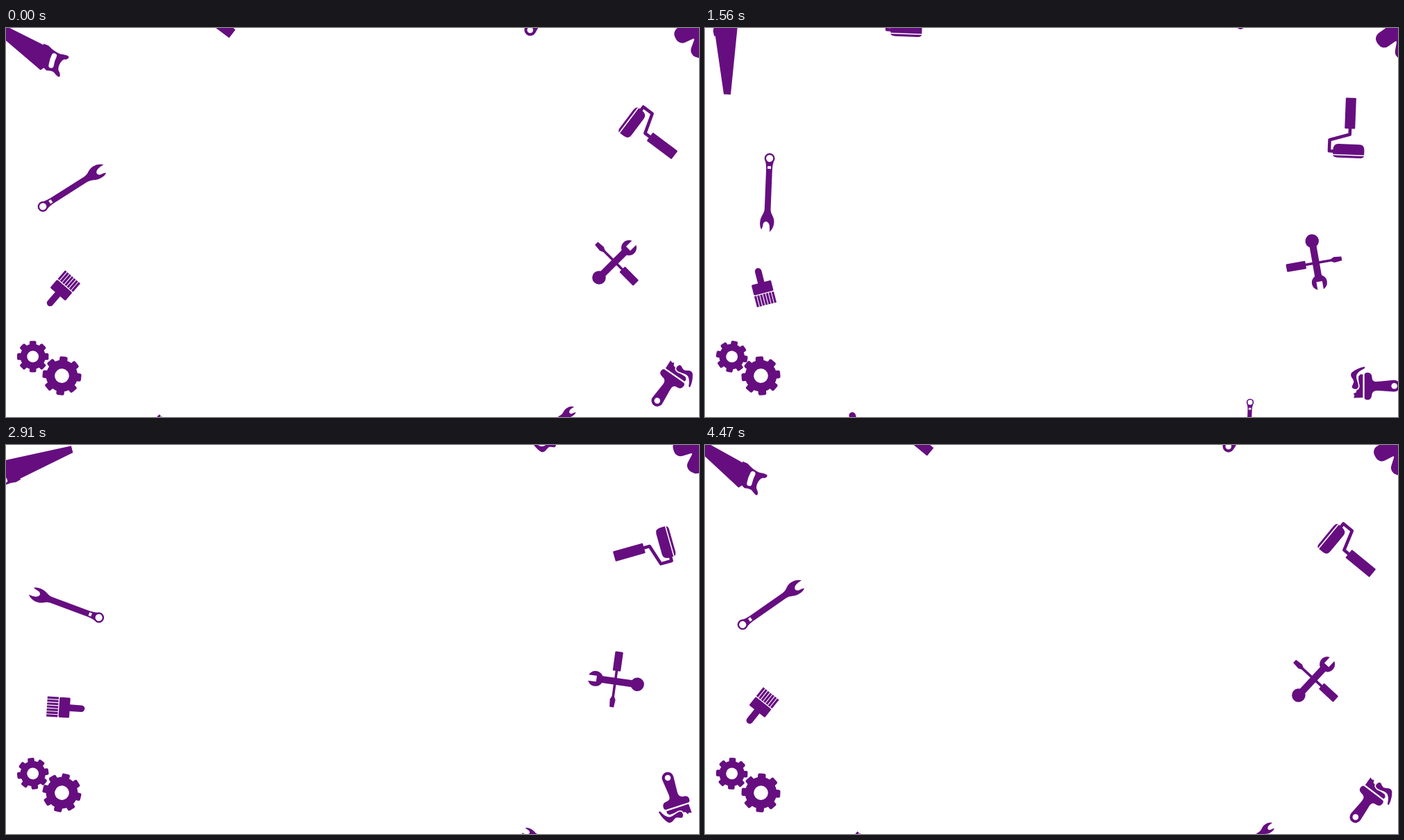
Recreate the animation shown at these times as an HTML page. Size 998 by 561 pixels, loop 4.5 s.

```html
<!DOCTYPE html>
<html lang="en">
<head>
<meta charset="utf-8">
<title>Turning tools</title>
<style>
  html, body { margin: 0; width: 100%; height: 100%; overflow: hidden; background: #fff; }
  svg { display: block; width: 998px; height: 561px; fill: #660e80; }
  .line { fill: none; stroke: #660e80; stroke-linejoin: round; }
  .cut { fill: none; stroke: #fff; }
  .hole { fill: #fff; }
</style>
</head>
<body>
<svg id="stage" viewBox="0 0 998 561"></svg>
<script>
const LOOP = 4500, STEP = 30;

const repeat = (n, draw) => Array.from({ length: n }, (_, i) => draw(i)).join('');

const gear = (root, outer, half, round, hole) =>
  `<circle r="${root}"/>` +
  repeat(8, i => `<rect y="${-half}" width="${outer}" height="${half * 2}" rx="${round}" transform="rotate(${i * 45})"/>`) +
  `<circle class="hole" r="${hole}"/>`;

// Every shape is drawn around its own pivot.
const saw = `
  <path d="M8.3-67.8 17.9-65.2 12.3 20 14 19 14 27Q9 38 9.500 48Q12 56 11 59.5Q9 61.5 5.500 58
    Q5 53-3 52Q-12 51-15 56Q-19 60-21.500 58.5Q-23 57-18.500 49Q-17 45-20 38L-18 33-23 30Z"/>
  <path class="cut" stroke-width="7.400" stroke-linecap="round" d="M-10.800 41.500Q-3 39.500 3.800 40"/>`;

const wrench = `
  <circle cx="-45.2" r="7.5"/>
  <path d="M-41-6Q-36-4.500-30-4.400H28C37-4.700 37-10 47-10Q55-10 61-4Q55-4.300 51-3.400
    Q46.500-2 45.800 1.400Q46.500 5.200 50 5.700Q54 6 57.800 7.800Q54 10.500 48 10.200C38 10 36 4.700 28 4.400H-30Q-36 4.500-41 6Z"/>
  <circle class="hole" cx="-45.2" r="5.1"/>
  <rect class="hole" x="-34" y="-2.500" width="4" height="5"/>`;

const brush = `
  <g transform="translate(0 -1.3)">
    <rect x="-31.500" y="-4.800" width="26" height="9.600" rx="4.800"/>
    <rect x="-10" y="-14.500" width="15.500" height="29" rx="1.500"/>
    ${repeat(7, i => `<rect x="6.800" y="${-14.5 + i * 4.3}" width="16.200" height="3.200"/>`)}
  </g>`;

const roller = `
  <rect x="-4" y="-50" width="15" height="44.600" rx="1"/>
  <path class="line" stroke-width="4.600" d="M3.800-6V2.900L-25 11.700V27.800H-18"/>
  <path d="M-19.700 32V25Q-19 17-12 17H18Q25.400 17 25.400 25V32Z"/>
  <path d="M-19.700 33.600H25.400Q24 36.700 20 36.700H-13Q-18 36.700-19.700 33.600Z"/>`;

const crossed = `
  <circle cx="-31.800" cy="-1.900" r="9.800"/>
  <rect x="-30" y="-6.900" width="56" height="10"/>
  <circle cx="29" cy="-2" r="11"/>
  <path class="cut" stroke-width="8.600" d="M27.500-2H43"/>
  <rect x="-1.500" y="-27" width="3.600" height="42"/>
  <path d="M-1.500-24-3.700-28.500-2.700-39.500H3.300L4.300-28.500 2.100-24Z"/>
  <rect x="-5.400" y="13" width="11.500" height="28.200" rx="1.300"/>`;

const paintbrush = `
  <path d="M-10-13Q-9.500-16-5-15.500Q.500-15 .8-9C1.200-2 5-2.300 11-2.700L32-4.700
    A8.400 8.400 0 1 1 32 12L11 10.500C5 10 1.200 11 .6 17Q0 23.500-5 23.700Q-9.500 24-10 21Z"/>
  <circle class="hole" cx="33" cy="3.700" r="4.300"/>
  <path d="M-12.300-13V20.500L-25.500 21-24.300 17-26 15-22 13-21 9.500Q-17 9-17 3Q-19-4-18.500-10L-16-13Z"/>
  <path d="M-10-24Q-21-22-28.500-15.500C-32-10-26-7-25.500-3S-30 4-27 7Q-24 9-21 8Q-18 6-19 2
    C-20-4-23-8-21-13Q-18-18-11-21Q-8.500-22.500-10-24Z"/>`;

// shape, pivot x, pivot y, starting angle, direction, scale
const tools = [
  [saw, 31, 28, 292.8, -1],
  [wrench, 91.3, 233.2, -32.5, 1],
  [brush, 82, 377.2, -49.1, 1],
  [gear(18.2, 22.7, 4.8, 2, 8.4), 38.7, 473.9, 0, -1],
  [gear(22.8, 27.9, 5.7, 2.4, 10.3), 80.5, 501.6, 5.5, 1],
  [roller, 925, 150.5, 127, -1],
  [crossed, 877.9, 338.9, -44.8, 1],
  [paintbrush, 959.7, 512.5, 124.8, -1],
  [gear(33, 54, 11.8, 10, 0), 1013, -8.5, 20, 1],
  [roller, 288.1, -24.5, 127, -1],
  [paintbrush, 776.7, -22, 124.8, -1],
  [brush, 217.5, 585, -49.1, 1],
  [wrench, 783.8, 571.5, -32.5, 1, 0.7],
];

const stage = document.getElementById('stage');
stage.innerHTML = tools.map(([shape]) => `<g>${shape}</g>`).join('');
const groups = [...stage.children];

function draw(now) {
  const time = Math.floor((now % LOOP) / STEP) * STEP;
  const turn = 360 * time / LOOP;
  tools.forEach(([, x, y, start, direction, scale = 1], i) =>
    groups[i].setAttribute('transform',
      `translate(${x} ${y}) rotate(${start + direction * turn}) scale(${scale})`));
  requestAnimationFrame(() => draw(performance.now()));
}
draw(0);
</script>
</body>
</html>
```
